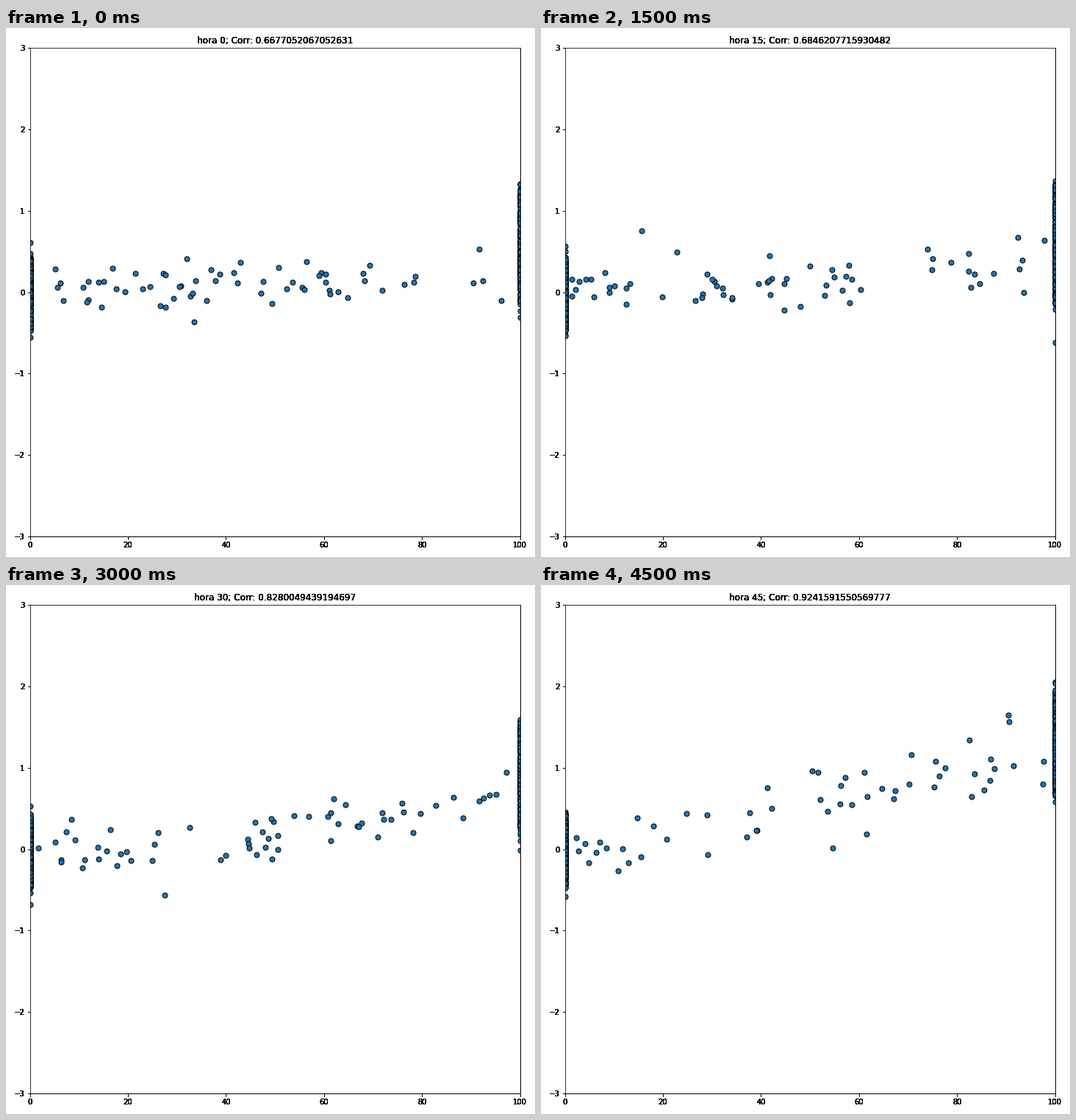
A matplotlib script that plays this animation: 720 px wide and 720 px high, repeating every 5 s.

```python
import numpy as np
import matplotlib.pyplot as plt
from matplotlib.animation import FuncAnimation

STEP = 5          # hours per frame
LAYERS = 8        # stacked axes give the heavy lettering
PER_EDGE = 230    # points in each saturated column

CORR = ["0.6677052067052631", "0.6741823904415087", "0.6875150363561989",
        "0.6846207715930482", "0.6810499557517233", "0.7493618205574316",
        "0.8280049439194697", "0.88806557305523", "0.9188824876297231",
        "0.9241591550569777"]


def growth(hour):
    """Rise of the response: flat until hour 20, full near hour 43."""
    t = np.clip((hour - 20) / 23, 0, 1)
    return t * t * (3 - 2 * t)


def column(rng, x, low, high):
    body = low + (high - low) * rng.beta(1.3, 1.3, PER_EDGE)
    below = low - rng.exponential(.08, 2)
    above = high + rng.exponential(.06, 2)
    y = np.concatenate([body, [low, high], below, above])
    return np.column_stack([np.full(y.size, x), y])


def inner(rng, g):
    """Scattered points around a power curve that steepens with growth."""
    u = rng.uniform(.01, .98, rng.integers(56, 72))
    trend = .04 - .07 * g + (.45 + .85 * g) * u ** (3.8 - 2.4 * g)
    noise = (.14 + .04 * g) * rng.standard_t(6, u.size)
    return np.column_stack([100 * u, trend + noise])


def cloud(i):
    rng = np.random.default_rng(40 + i)
    g = growth(i * STEP)
    points = np.vstack([inner(rng, g),
                        column(rng, 0, -.47, .43),
                        column(rng, 100, -.15 + .82 * g, 1.32 + .63 * g)])
    rng.shuffle(points)
    return points


def add_layer(n):
    ax = fig.add_subplot(label=f"layer {n}")
    ax.set(xlim=(0, 100), ylim=(-3, 3),
           xticks=range(0, 101, 20), yticks=range(-3, 4))
    ax.set_title("hora 0; Corr: " + CORR[0])
    return ax


plt.rcParams["font.family"] = "DejaVu Sans"
fig = plt.figure(figsize=(10, 10), dpi=72)
layers = [add_layer(n) for n in range(LAYERS)]
fig.tight_layout()

# Only the top layer holds points; its white patch hides the axes below.
dots = layers[-1].scatter([], [], s=49, c="C0", edgecolors="black",
                          linewidths=1)
clouds = [cloud(i) for i in range(len(CORR))]


def update(i):
    dots.set_offsets(clouds[i])
    for ax in layers:
        ax.set_title(f"hora {i * STEP}; Corr: {CORR[i]}")
    return [dots]


anim = FuncAnimation(fig, update, frames=len(CORR), init_func=lambda: update(0),
                     interval=500, repeat=True, repeat_delay=0)
plt.show()
```
